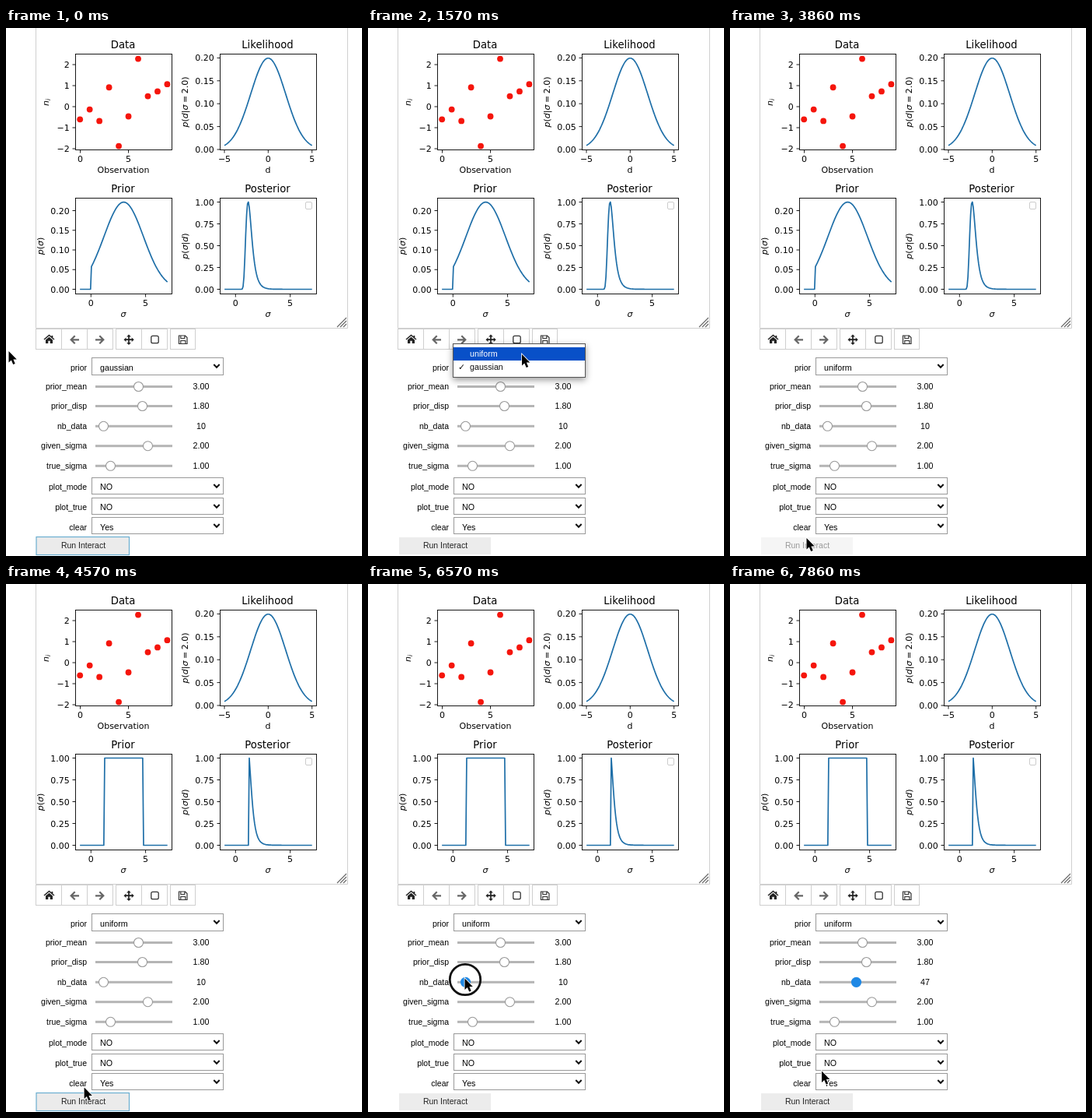
Animation of 458x678 px, one loop 8 s. Source, as an HTML page:

```html
<!DOCTYPE html>
<html lang="en">
<head>
<meta charset="utf-8">
<title>Bayesian inference widgets</title>
<style>
html, body { margin: 0; width: 100%; height: 100%; overflow: hidden; background: #fff; }
svg { display: block; width: 458px; height: 678px; }
.plot { font: 11px "DejaVu Sans", sans-serif; }
.title { font-size: 13.2px; }
.ui { font: 10.7px "Liberation Sans", Arial, sans-serif; }
i, .it { font-style: italic; }
</style>
</head>
<body>
<svg id="stage" viewBox="0 0 458 678"></svg>
<script>
const LOOP = 8000, STEP = 1000 / 7;
const stage = document.getElementById('stage');

const text = (x, y, s, anchor = 'start', extra = '') =>
  `<text x="${x}" y="${y}" text-anchor="${anchor}" ${extra}>${s}</text>`;
const rect = (x, y, w, h, fill, stroke = 'none', extra = '') =>
  `<rect x="${x}" y="${y}" width="${w}" height="${h}" fill="${fill}" stroke="${stroke}" ${extra}/>`;
const path = (d, stroke, width = 1, fill = 'none', extra = '') =>
  `<path d="${d}" stroke="${stroke}" stroke-width="${width}" fill="${fill}" ${extra}/>`;
const circle = (x, y, r, fill, stroke = 'none', width = 1) =>
  `<circle cx="${x}" cy="${y}" r="${r}" fill="${fill}" stroke="${stroke}" stroke-width="${width}"/>`;
const it = s => `<tspan class="it">${s}</tspan>`;

// ---- plots ----
const W = 124, H = 123;

function axes(x, y, title, xlabel, ylabel, labelX, labelY, xticks, yticks) {
  let marks = '', s = text(x + W / 2 - 1, y - 7.3, title, 'middle', 'class="title"');
  for (const [pos, label] of xticks) {
    marks += `M${pos} ${y + H}v4`;
    s += text(pos, y + H + 15.5, label, 'middle');
  }
  for (const [pos, label] of yticks) {
    marks += `M${x} ${pos}h-4`;
    s += text(x - 7.7, pos + 4, label, 'end');
  }
  s += text(x + W / 2 - .5, y + H + 29.5, xlabel, 'middle');
  s += `<text transform="translate(${labelX} ${labelY}) rotate(-90)" text-anchor="middle">${ylabel}</text>`;
  return s + rect(x, y, W, H, 'none', '#000', 'stroke-width=".9"') + path(marks, '#000', .9);
}

function curve(f, from, to, x0, kx, y0, ky) {
  const n = 100, pts = [];
  for (let i = 0; i < n; i++) {
    const v = from + (to - from) * i / (n - 1);
    pts.push((x0 + kx * v).toFixed(2) + ' ' + (y0 - ky * f(v)).toFixed(2));
  }
  return path('M' + pts.join('L'), '#1f6fa8', 1.7, 'none', 'stroke-linejoin="round"');
}

const gauss = (v, m, s) => Math.exp(-((v - m) ** 2) / (2 * s * s)) / (s * Math.sqrt(2 * Math.PI));
const priors = {
  gaussian: v => v < 0 ? 0 : gauss(v, 3, 1.8),
  uniform: v => v >= 1.2 && v <= 4.8 ? 1 : 0
};
const data = [-.6, -.13, -.68, .92, -1.87, -.46, 2.28, .5, .73, 1.07];
const sumSq = data.reduce((a, v) => a + v * v, 0);
const likelihood = v => v <= 0 ? 0 : v ** -data.length * Math.exp(-sumSq / (2 * v * v));

function posterior(prior) {
  const f = v => prior(v) * likelihood(v);
  let top = 0;
  for (let i = 0; i < 100; i++) top = Math.max(top, f(-1 + 8 * i / 99));
  return v => f(v) / top;
}

const ticks = (n, y0, dy, dv, digits) => Array.from({ length: n }, (_, i) =>
  [y0 - dy * i, (dv * i).toFixed(digits)]);

function plots(kind) {
  const sigma = it('σ'), unit = ticks(5, 335.5, 28, .25, 2);
  let s = axes(89.5, 33.5, 'Data', 'Observation',
    it('n') + '<tspan class="it" font-size="7.7" dy="2">i</tspan>', 55, 95.5,
    [[95.5, 0], [157.5, 5]], [2, 1, 0, '−1', '−2'].map((v, i) => [47 + 27 * i, v]));
  data.forEach((v, i) => s += circle(95.2 + 12.47 * i, 101.1 - 27 * v, 3.9, '#f5150c'));

  s += axes(275.5, 33.5, 'Likelihood', 'd',
    it('p') + '(' + it('d') + '|' + sigma + '<tspan dx="2.5">=</tspan><tspan dx="2.5">2.0)</tspan>', 234, 95,
    [[281, '−5'], [337.3, 0], [393.7, 5]], ticks(5, 156, 29.4, .05, 2));
  s += curve(v => gauss(v, 0, 2), -5, 5, 337.3, 11.27, 156, 588);

  const flat = kind === 'uniform', prior = priors[kind];
  s += axes(89.5, 218.5, 'Prior', sigma, it('p') + '(' + sigma + ')', 47.5, 280,
    [[109.3, 0], [179.6, 5]], flat ? unit : ticks(5, 335.5, 25.25, .05, 2));
  s += curve(prior, -1, 7, 109.2, 14.07, 335.5, flat ? 112 : 505);

  s += axes(275.5, 218.5, 'Posterior', sigma, it('p') + '(' + sigma + '|' + it('d') + ')', 234, 280,
    [[295.3, 0], [365.6, 5]], unit);
  s += curve(posterior(prior), -1, 7, 295.2, 14.07, 335.5, 112);
  s += rect(385.5, 223.5, 8, 9, '#fff', '#ccc', 'rx="1.5"');
  return `<g class="plot">${s}</g>`;
}

// ---- toolbar ----
function toolbar() {
  let s = path('M38.5 0V385.5H439.5V0', '#d0d0d0');
  s += path('M426 384l12-12M430 384l8-8M434 384l4-4', '#666', 1.1);
  for (const [x, w] of [[38.5, 33], [71.5, 33], [104.5, 33], [141.5, 33], [174.5, 33], [211.5, 32]])
    s += rect(x, 386.5, w, 26, '#fff', '#cfcfcf');
  s += path('M49 400l6.5-5.5 6.5 5.5', '#222', 1.5);
  s += path('M51 400.5l4.5-3.8 4.5 3.8v4.5h-3.3v-3.2h-2.4v3.2H51zM58.5 395h1.8v3l-1.8-1.5z', 'none', 0, '#222');
  s += path('M94 400.3H84M88.7 395.3l-5 5 5 5', '#666', 2.2);
  s += path('M115 400.3h10M120.3 395.3l5 5-5 5', '#666', 2.2);
  s += path('M158 395v10.5M153 400.2h10.5', '#222', 1.7);
  s += path('M158 393.5l2.8 3h-5.6zM158 407l2.8-3h-5.6zM151.5 400.2l3-2.8v5.6zM164.7 400.2l-3-2.8v5.6z', 'none', 0, '#222');
  s += rect(186.8, 395.3, 9.4, 9.4, 'none', '#333', 'rx="2" stroke-width="1.3"');
  s += path('M222.5 395h8l2.5 2.5v8h-10.5zM224.8 395v3.5h5V395M224.8 405.500v-4h6v4', '#333', 1.2);
  return s;
}

// ---- form ----
const label = (y, s) => text(104, y, s, 'end', 'font-size="10.5"');

function select(name, value, y, h, base, focus) {
  return label(base, name) + rect(110.5, y, 169, h, '#fff', focus ? '#64b0cc' : '#999') +
    text(121, base, value) + path(`M267.300 ${y + 8.5}l3.700 3.800 3.700-3.800`, '#111', 2);
}

function slider(name, y, x, value, active) {
  return label(y + 3.5, name) + rect(115, y - 1.5, 99, 3, '#b5b5b5') +
    (active ? circle(x, y, 6.6, '#1e88e5') : circle(x, y, 6, '#fff', '#999', 1.1)) +
    text(251, y + 3.7, value, 'middle');
}

function button(state) {
  const box = state === 'focus' ? rect(39, 653.5, 119.5, 23, '#ebebeb', '#6aaed0', 'stroke-width="1.2"')
    : rect(40, 654, 118, 22, state === 'busy' ? '#f5f5f5' : '#ececec');
  return box + text(99.5, 668.3, 'Run Interact', 'middle',
    `font-size="10.5" fill="${state === 'busy' ? '#999' : '#222'}"`);
}

function popup(top) {
  return rect(109.5, 405.5, 170, 43, '#fff', '#555', 'style="filter:drop-shadow(0 3px 4px #0006)"') +
    rect(110, 410 + (top ? 0 : 17), 169, 17, '#0850c8') +
    text(131, 422, 'uniform', 'start', `fill="${top ? '#fff' : '#111'}"`) +
    `<g fill="${top ? '#111' : '#fff'}">` + text(131, 439, 'gaussian') +
    text(116, 439, '✓', 'start', 'font-family="DejaVu Sans, sans-serif"') + '</g>';
}

// ---- pointer: time, x, y ----
const route = [
  [0, 3.5, 415], [140, 120, 414], [400, 120, 414], [860, 203, 432], [1300, 203, 432],
  [1560, 198, 419], [1860, 198, 419], [2570, 152, 571], [2857, 149, 590], [3280, 98.5, 655],
  [4430, 98.5, 655], [5430, 137.5, 499], [5580, 137, 499], [6420, 124.5, 506.5],
  [6600, 124.5, 506.5], [7290, 161.5, 507], [7400, 161.5, 507], [7857, 118, 625.5], [8000, 118, 627]
];
const presses = [[990, 1130], [1700, 1850], [3280, 3560], [6420, 7290]];
const within = (t, a, b) => t >= a && t < b;

function pointer(t) {
  let i = 1;
  while (i < route.length - 1 && t > route[i][0]) i++;
  const [t0, x0, y0] = route[i - 1], [t1, x1, y1] = route[i];
  const u = Math.min(1, Math.max(0, (t - t0) / (t1 - t0))), e = u * u * (3 - 2 * u);
  return [x0 + (x1 - x0) * e, y0 + (y1 - y0) * e];
}

function scene(t) {
  const [px, py] = pointer(t);
  const chosen = t >= 1850 ? 'uniform' : 'gaussian';
  const count = t < 6600 ? 10 : t < 7290 ? Math.round(10 + px - 124.5) : 47;
  const run = within(t, 3560, 4140) ? 'busy'
    : t < 990 || within(t, 3280, 6420) ? 'focus' : 'idle';

  let form = select('prior', chosen, 423.5, 22, 440, within(t, 990, 3280));
  form += slider('prior_mean', 460.5, 170.5, '3.00') + slider('prior_disp', 485.5, 175.5, '1.80');
  form += slider('nb_data', 511.3, 115.5 + count, count, t >= 6420);
  form += slider('given_sigma', 536.7, 182.5, '2.00') + slider('true_sigma', 562.3, 134.5, '1.00');
  form += select('plot_mode', 'NO', 577.5, 21, 593) + select('plot_true', 'NO', 603.5, 21, 619);
  form += select('clear', 'Yes', 628.5, 21, 645) + button(run);
  if (within(t, 1130, 1850)) form += popup(t >= 1420);

  let s = plots(t >= 4140 ? 'uniform' : 'gaussian') + toolbar() + `<g class="ui">${form}</g>`;
  if (presses.some(([a, b]) => within(t, a, b))) s += circle(px + .5, py + 1.5, 19.7, 'none', '#111', 2.8);
  return s + path('M0 0V14.500L3.300 11.400 5.700 17 8.200 15.900 5.900 10.500H10.300Z', '#fff', 1.6, '#000',
    `paint-order="stroke" transform="translate(${px} ${py})"`);
}

let shown = -1;
const start = performance.now();
function tick(now) {
  const t = Math.max(0, now - start) % LOOP, step = Math.min(55, Math.floor((t + 4) / STEP));
  if (step !== shown) {
    shown = step;
    stage.innerHTML = scene(step * STEP);
  }
  requestAnimationFrame(tick);
}
tick(start);
</script>
</body>
</html>
```
